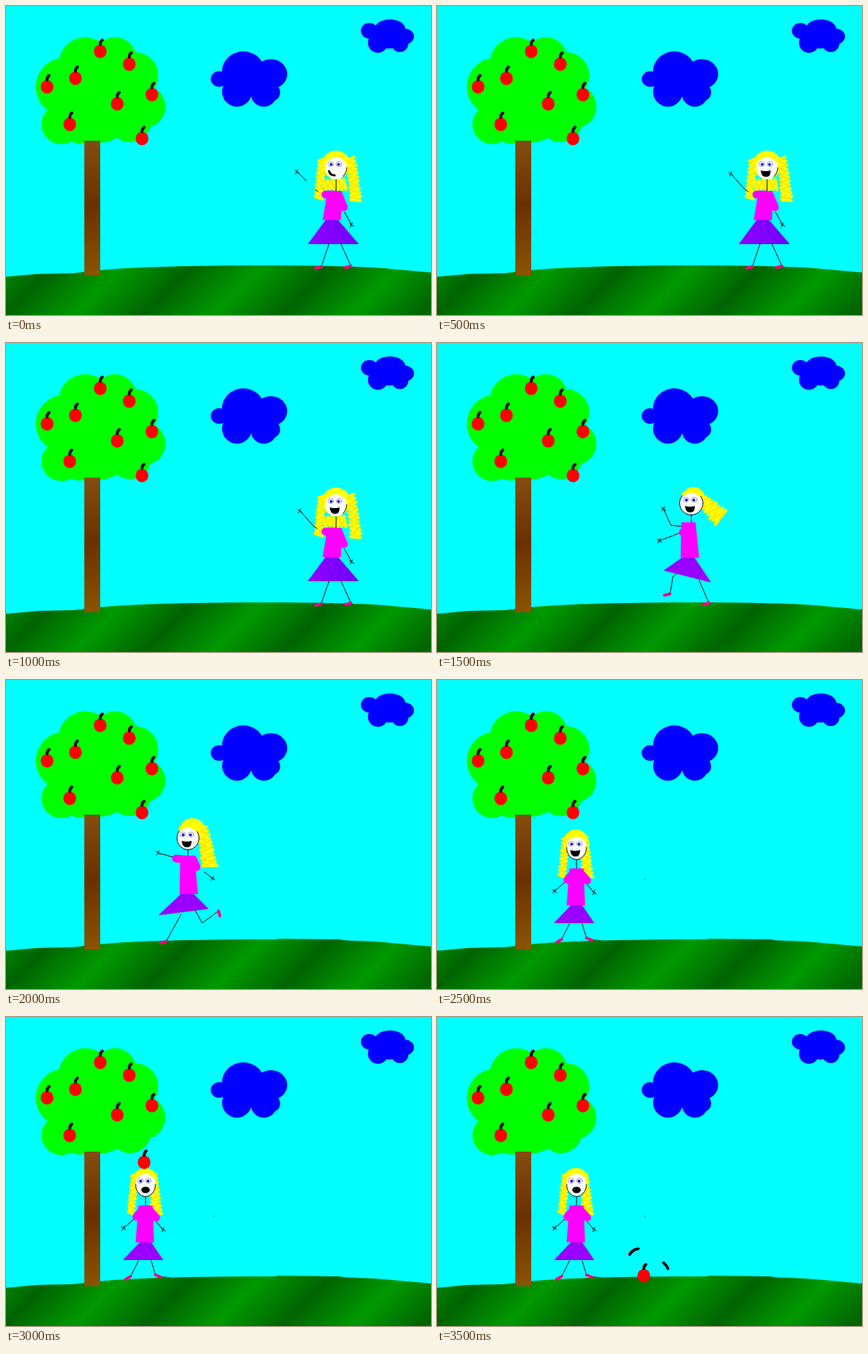
An HTML page for the animation above (4 s loop, 600 px wide and 436 px high).

```html
<!DOCTYPE html>
<html lang="en">
<head>
<meta charset="utf-8">
<title>Apple tree</title>
<style>
html, body { margin: 0; height: 100%; overflow: hidden; background: #0ff; }
svg { display: block; width: 100vw; height: 100vh; }
</style>
</head>
<body>
<svg viewBox="0 0 600 436" fill="none" stroke-linecap="round" stroke-linejoin="round">
  <defs>
    <linearGradient id="grass" gradientUnits="userSpaceOnUse" x1="230" y1="400" x2="279" y2="449" spreadMethod="reflect">
      <stop stop-color="#006400"/><stop offset="1" stop-color="#009900"/>
    </linearGradient>
    <linearGradient id="bark" gradientUnits="userSpaceOnUse" x1="110" y1="185" x2="150" y2="375">
      <stop stop-color="#855010"/><stop offset=".5" stop-color="#6b3000"/><stop offset="1" stop-color="#8a5500"/>
    </linearGradient>
    <linearGradient id="violet">
      <stop stop-color="#9000ff"/><stop offset="1" stop-color="#7000ff"/>
    </linearGradient>
  </defs>
  <g id="scenery"></g>
  <g id="actors"></g>
</svg>
<script>
const MAGENTA = '#f0f', PURPLE = '#90f', PINK = '#ff0080', YELLOW = '#ff0', GOLD = '#ffe600';

const area = (d, fill) => `<path d="M${d}z" fill="${fill}"/>`;
const line = (d, color = '#000', width = 1, extra = '') =>
  `<path d="M${d}" stroke="${color}" stroke-width="${width}" ${extra}/>`;
const oval = (x, y, rx, ry, fill, extra = '') =>
  `<ellipse cx="${x}" cy="${y}" rx="${rx}" ry="${ry}" fill="${fill}" ${extra}/>`;
const puffs = (fill, lobes) => lobes.map(([x, y, rx, ry = rx]) => oval(x, y, rx, ry, fill)).join('');
const apple = (x, y) => oval(x, y, 9, 9.5, '#f00') + line(`${x} ${y - 10}q0 -4 3 -6`, '#000', 4);

// A zigzag scribble of hair whose half-width grows from a0 to a1.
function lock([x0, y0, x1, y1, a0, a1]) {
  const length = Math.hypot(x1 - x0, y1 - y0);
  const nx = (y0 - y1) / length, ny = (x1 - x0) / length;
  let seed = 7;
  const random = () => (seed = seed * 16807 % 2147483647) / 2147483647;
  const scribble = (step, color, width) => {
    const points = [];
    for (let i = 0; i * step <= length; i++) {
      const t = i * step / length;
      const side = (a0 + (a1 - a0) * t) * (i % 2 ? 1 : -1) * (0.8 + 0.3 * random());
      points.push([x0 + (x1 - x0) * t + nx * side, y0 + (y1 - y0) * t + ny * side]);
    }
    return line(points.join('L'), color, width);
  };
  return scribble(2.8, YELLOW, 4.5) + scribble(5, GOLD, 2);
}

const mouths = {
  smile: (x, y) => line(`${x - 10} ${y + 5}q2 6 8 6`, '#000', 3),
  open: (x, y) => area(`${x - 9} ${y + 4}q7 2 14 0q0 10 -7 9q-6 0 -7 -9`, '#000'),
  gasp: (x, y) => oval(x, y + 8, 6, 4.5, '#000')
};

function head([x, y, rx, ry], mouth, outline) {
  const eye = (dx, look) =>
    oval(x + dx, y - 5, 4, 3.5, '#fff', 'stroke="#889" stroke-width=".8"') + oval(x + dx + look, y - 4.5, 2, 2, '#11d');
  return oval(x, y, rx, ry, '#fff') +
    oval(x, y, rx, ry, 'none', `stroke="#000" pathLength="100" stroke-dasharray="${outline} 100"`) +
    line(`${x - 11} ${y - 13}Q${x} ${y - 22} ${x + 12} ${y - 12}`, YELLOW, 5) +
    eye(-7.5, .5) + eye(4, -.5) + mouths[mouth](x, y);
}

function arm(points, dash = 'none') {
  const [x, y] = points.at(-1);
  return line(points.join('L'), '#000', 1, `stroke-dasharray="${dash}"`) +
    line(`${x - 3} ${y - 2}l6 4M${x - 2} ${y + 3}l3 -6`);
}

const leg = ({ points, foot = [-8, 2] }) =>
  line(points.join('L')) + line(`${points.at(-1)}l${foot}`, PINK, 4);

function torso([x0, y0, x1, y1], sleeves) {
  return area(`${x0 - 10} ${y0}H${x0 + 10}L${x1 + 13} ${y1}H${x1 - 13}`, MAGENTA) +
    sleeves.map(d => line(d, MAGENTA, 11)).join('');
}

const skirt = ([x, y], left, right, fill) =>
  area(`${x - 8} ${y}H${x + 8}L${right}L${left}`, fill);

function girl(p) {
  const [x, y, , ry] = p.face;
  return oval(...p.cap, p.cap[2], YELLOW) + p.locks.map(lock).join('') +
    line(`${x} ${y + ry}V${p.torso[1]}`) +
    head(p.face, p.mouth || 'open', p.outline || 100) +
    p.arms.map(points => arm(points)).join('') + p.legs.map(leg).join('') +
    skirt(...p.skirt, p.fill || PURPLE) + torso(p.torso, p.sleeves);
}

const standing = {
  face: [466, 228, 15, 16.5], outline: 14, cap: [466, 224, 20], fill: 'url(#violet)',
  locks: [[446, 216, 441, 272, 4, 5], [487, 214, 494, 276, 5, 7], [449, 252, 480, 252, 7, 7]],
  torso: [464, 261, 460, 302], sleeves: ['451 266H464', '470 267L477 284'],
  skirt: [[460, 301], [426, 336], [498, 336]],
  arms: [[[478, 291], [488, 309]]],
  legs: [{ points: [[456, 336], [445, 368]] }, { points: [[473, 336], [487, 367]] }]
};

const skipping = {
  face: [359, 226, 16.5, 16.5], cap: [362, 219, 16],
  locks: [[363, 210, 403, 249, 4, 13]],
  torso: [355, 253, 357, 303], sleeves: ['347 267H352'],
  skirt: [[355, 302], [320, 321], [387, 338]],
  arms: [[[346, 259], [330, 257], [320, 234]], [[343, 268], [314, 279]]],
  legs: [{ points: [[340, 324], [333, 330], [329, 354]] }, { points: [[370, 335], [384, 367]] }]
};

const running = {
  face: [257, 223, 15.5, 16.5], cap: [263, 214, 19],
  locks: [[278, 208, 287, 264, 6, 10]],
  torso: [256, 248, 258, 302], sleeves: ['240 252L252 253', '264 253L269 264'],
  skirt: [[256, 301], [215, 332], [286, 323]],
  arms: [[[236, 250], [215, 244]], [[280, 271], [292, 280]]],
  legs: [
    { points: [[247, 331], [226, 369]] },
    { points: [[267, 325], [277, 343], [300, 326]], foot: [2, 7] }
  ]
};

const waiting = {
  face: [197, 236, 14, 17.5], outline: 50, cap: [196, 229, 18],
  locks: [[182, 222, 176, 278, 4, 4], [209, 222, 212, 278, 3, 7]],
  torso: [197, 266, 196, 318], sleeves: ['194 271L184 282', '201 271L212 283'],
  skirt: [[197, 318], [165, 343], [222, 343]],
  arms: [[[182, 284], [166, 298]], [[212, 289], [222, 300]]],
  legs: [
    { points: [[187, 344], [176, 366]], foot: [-7, 4] },
    { points: [[205, 344], [211, 364]], foot: [8, 3] }
  ]
};

const scenery =
  puffs('#00f', [[301, 103, 12, 11], [335, 92, 30, 28], [374, 96, 23, 21], [375, 122, 12], [326, 121, 21], [364, 125, 18, 17], [350, 110, 25, 18]]) +
  puffs('#00f', [[513, 35, 12, 11], [542, 33, 22, 14], [563, 43, 13, 11], [525, 52, 14], [556, 53, 12], [541, 48, 14, 12]]) +
  puffs('#0f0', [[112, 82, 38], [154, 74, 30], [182, 98, 33], [83, 114, 41], [195, 142, 30], [78, 167, 28], [105, 160, 34], [175, 162, 30], [130, 140, 53]]) +
  area('0 382L45 378 95 377 130 373C220 364 480 364 545 371L600 376V436H0', 'url(#grass)') +
  area('110.5 190H133V380H110.5', 'url(#bark)') +
  [[133, 64], [174, 82], [98, 102], [58, 114], [206, 125], [157, 138], [90, 167]].map(spot => apple(...spot)).join('');

const rightMound = area('374 369L384 365 470 366 490 369', 'url(#grass)');
const mounds = rightMound + area('205 370L222 366 245 369', 'url(#grass)') + line('293 281h.5');
const ripeApple = apple(192, 187);
const impact = line('272 335q4 -7 12 -8M320 347q4 3 6 8', '#000', 4);

const greeting = ripeApple + girl({ ...standing, mouth: 'smile' }) + arm([[440, 262], [411, 234]], '4 18 30');
const calling = ripeApple + girl(standing) + arm([[439, 262], [433, 257], [415, 237]]);
const startled = mounds + girl({ ...waiting, mouth: 'gasp', cap: [196, 231, 18] });

const poses = [
  greeting,
  calling,
  calling,
  ripeApple + girl(skipping),
  ripeApple + rightMound + girl(running),
  ripeApple + mounds + girl(waiting),
  startled + apple(195, 205),
  startled + apple(292, 365) + impact
];

const actors = document.getElementById('actors');
document.getElementById('scenery').innerHTML = scenery;
const start = performance.now();
let shown = -1;

function draw() {
  const index = Math.floor((performance.now() - start) % 4000 / 500);
  if (index !== shown) {
    actors.innerHTML = poses[index];
    shown = index;
  }
  requestAnimationFrame(draw);
}
draw();
</script>
</body>
</html>
```
